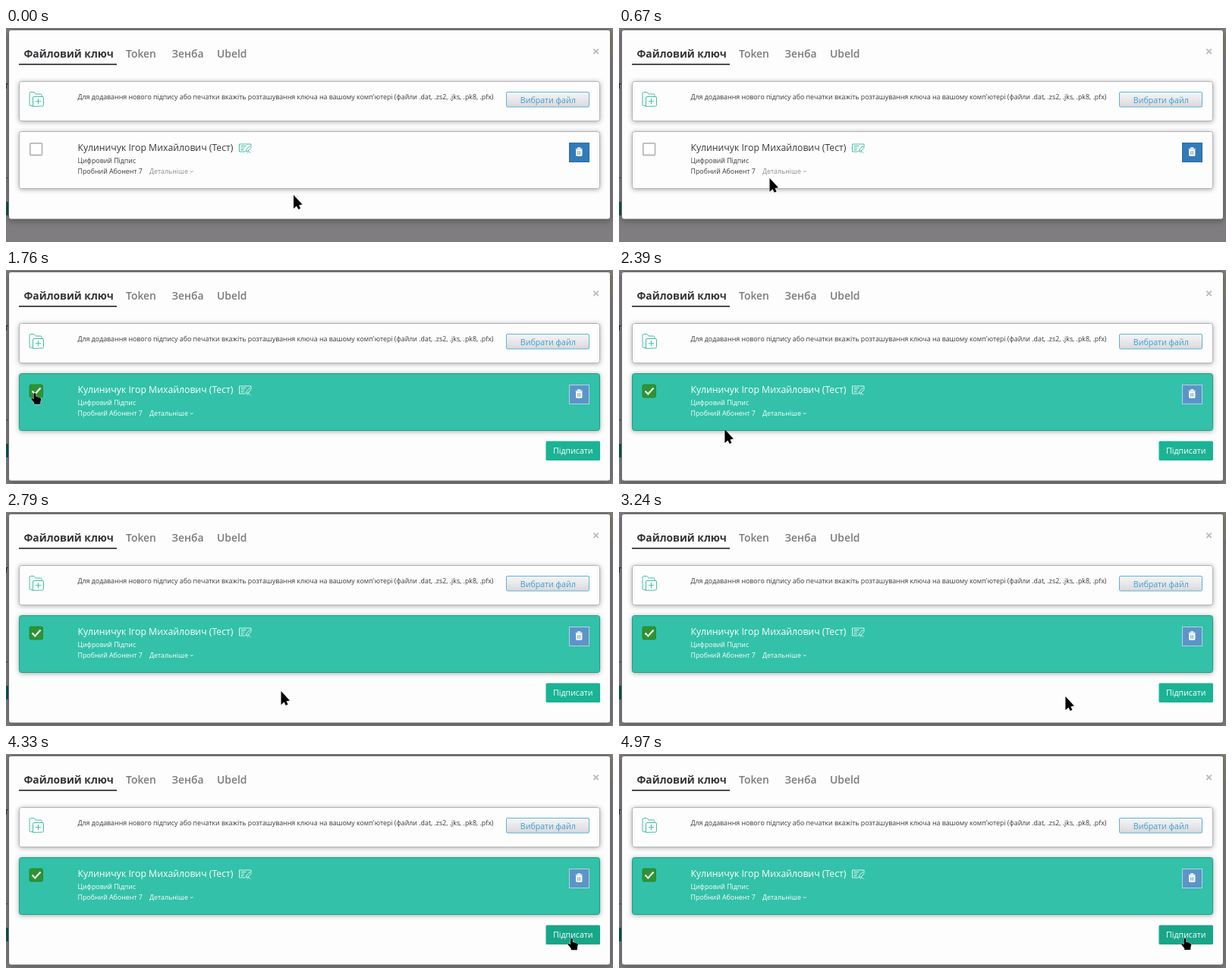
These frames come from a looping animation (800x282 px, 5000 ms). An HTML page:

```html
<!DOCTYPE html>
<html lang="uk">
<head>
<meta charset="utf-8">
<title>Вибір ключа</title>
<style>
html, body { margin: 0; width: 100%; height: 100%; overflow: hidden; background: #7f7d7f; }
svg { display: block; width: 800px; height: 282px; font-family: "Open Sans", "Noto Sans", sans-serif; font-size: 8.83px; }
.tab { font-size: 13.9px; font-weight: 600; fill: #7b7b7d; }
.tab.on { font-weight: 700; fill: #333336; font-size: 13.8px; }
.body { fill: #38383b; }
.name { font-size: 12.28px; }
.more { fill: #8b8b8d; }
.btn { font-size: 10.6px; text-anchor: middle; }
.line { fill: none; stroke: #3fc0a4; stroke-width: 1; stroke-linejoin: round; stroke-linecap: round; }
.panel { fill: #fefdfe; stroke: #b4b2b6; filter: drop-shadow(0 1px 3px rgba(0, 0, 0, .32)); }
.trash rect { fill: #337ab7; stroke: #2e6da4; }
.picked .card { fill: #33c1a9; stroke: #1f9f87; }
.picked .body, .picked .more { fill: #fff; }
.picked .line { stroke: #d9f7ef; }
.picked .trash rect { fill: #5b95c8; stroke: #b5d2e6; }
.on-only { display: none; }
.picked .on-only { display: inline; }
.picked .off-only { display: none; }
.sign { fill: #1ab394; }
.sign.hover { fill: #18a689; }
.cursor { fill: #000; stroke: #fff; stroke-width: .8; stroke-linejoin: round; paint-order: stroke; }
</style>
</head>
<body>
<svg id="stage" viewBox="0 0 800 282">
  <rect width="800" height="282" fill="#7f7d7f"/>
  <g>
    <rect x="797" width="3" height="36" fill="#85846f"/>
    <path d="M0 73.5H3M.5 73V80" stroke="#2b2a2b" fill="none"/>
    <path d="M0 197.5H4" stroke="#4b494b"/>
    <rect y="229" width="4" height="18" fill="#0d5a4a"/>
  </g>

  <rect id="modal" x="3.5" y="2.5" width="793" height="249.5" rx="3" fill="#fefdfe" stroke="#69676a"
    style="filter: drop-shadow(0 2px 4px rgba(0,0,0,.3))"/>

  <text class="tab on" x="23.5" y="39">Файловий ключ</text>
  <text class="tab" x="158" y="39">Token</text>
  <text class="tab" x="218.5" y="39">Зенба</text>
  <text class="tab" x="278" y="39">Ubeld</text>
  <rect x="17" y="47" width="129" height="1.7" fill="#2f2f31"/>
  <path d="M774.4 27.7l6.4 6.4m0-6.4l-6.4 6.4" stroke="#bdbbbe" stroke-width="1.9"/>

  <rect class="panel" x="17.5" y="70.5" width="765" height="52" rx="3"/>
  <path class="line" stroke-width="1.2" d="M35 102.5H32.5Q31 102.5 31 101V86Q31 84.500 32.500 84.500H37L39 87H45.500Q47 87 47 88.500V90M35.500 103V92Q35.500 90.500 37 90.500H48Q49.500 90.500 49.500 92V101.500Q49.500 103 48 103ZM42.500 93.500V100M39.300 96.700H45.700"/>
  <text class="body" x="94.500" y="94">Для додавання нового підпису або печатки вкажіть розташування ключа на вашому комп'ютері (файли .dat, .zs2, .jks, .pk8, .pfx)</text>
  <linearGradient id="grey" x2="0" y2="1">
    <stop stop-color="#f7f6f7"/><stop offset="1" stop-color="#d9d8da"/>
  </linearGradient>
  <rect x="659.500" y="84.500" width="109" height="19.500" rx="1.500" fill="url(#grey)" stroke="#5cb2da"/>
  <text class="btn" x="714.300" y="98.500" fill="#3a9fd2">Вибрати файл</text>

  <g id="key">
    <rect class="panel card" x="17.500" y="136.500" width="765" height="75" rx="3"/>
    <rect class="off-only" x="31.800" y="151.800" width="15.700" height="15.700" rx="1" fill="#fff" stroke="#b9b7ba" stroke-width="1.800"/>
    <g class="on-only">
      <rect x="31" y="151" width="17.500" height="17" rx="2" fill="#2f9332" stroke="#258029" stroke-width=".8"/>
      <path d="M34.500 159.500l3.800 4L45.500 155.500" fill="none" stroke="#fff" stroke-width="2.100"/>
    </g>
    <text class="body name" x="94.500" y="162.300">Кулиничук Ігор Михайлович (Тест)</text>
    <path class="line" d="M315 163H307.500V153H323V156M310 155.500H316M310 158H314M310 160.500H313M317 160l4-4.500 2 2-4 4.500-2.500.5zM318 164.500l2-2 2 2"/>
    <text class="body" x="94.500" y="177.800">Цифровий Підпис</text>
    <text class="body" x="94.500" y="191.800">Пробний Абонент 7</text>
    <text class="more" x="189" y="191.800">Детальніше</text>
    <path class="chevron" d="M243 188.300l1.700 1.700 1.700-1.700" fill="none" stroke="#929294"/>
    <g class="trash">
      <rect x="742.500" y="151.500" width="26" height="25"/>
      <path d="M751.500 160.500H759V167.500Q759 168.500 758 168.500H752.500Q751.500 168.500 751.500 167.500ZM750.700 159.200H759.800M753.500 159V157.800H757V159" fill="#fff" stroke="#fff" stroke-width=".9"/>
      <path d="M753.600 162V167M755.300 162V167M757 162V167" stroke="#337ab7" stroke-width=".6"/>
    </g>
  </g>

  <g id="submit">
    <rect id="sign" class="sign" x="711.500" y="225.500" width="71.500" height="25.500" rx="1.500"/>
    <text class="btn" x="747.300" y="242.300" fill="#fff">Підписати</text>
  </g>

  <path id="arrow" class="cursor" d="M0 0V18L4 14.500 6.300 19 9 17.700 7 13.400 11.500 12.500Z"/>
  <path id="hand" class="cursor" d="M-1.500 1Q0-1 1.400 1V5L3 4.800 4 5.600 5.600 5.500 6.300 6.400Q8.500 6.200 8.300 8.500L7.300 12V15H-.8V13L-4.600 8.300Q-4.900 6.500-3 6.900L-1.500 8.300Z"/>
</svg>
<script>
const LOOP = 5000, PICK = 1760;

// time, x, y of the pointer tip
const path = [
  [0, 379, 220], [250, 362, 219], [550, 255, 207], [850, 118, 182], [1050, 66, 171],
  [1210, 57, 169], [1450, 38, 162], [1880, 38, 162], [2100, 57, 180], [2390, 139, 210],
  [2700, 310, 231], [3000, 480, 243], [3240, 588, 243], [3500, 688, 244],
  [3790, 739, 245], [4050, 743, 244], [4480, 746, 243], [5000, 746, 243]
];
const $ = id => document.getElementById(id);
const modal = $('modal'), key = $('key'), submit = $('submit');
const sign = $('sign'), arrow = $('arrow'), hand = $('hand');
const chevron = key.querySelector('.chevron');

function slope(i, axis) {
  const a = path[i - 1], b = path[i], c = path[i + 1];
  if (!a || !c) return 0;
  const before = (b[axis] - a[axis]) / (b[0] - a[0]);
  const after = (c[axis] - b[axis]) / (c[0] - b[0]);
  return before * after > 0 ? 2 * before * after / (before + after) : 0;
}

function along(t, axis) {
  let i = 0;
  while (i < path.length - 2 && t >= path[i + 1][0]) i++;
  const a = path[i], b = path[i + 1], span = b[0] - a[0];
  const u = (t - a[0]) / span, v = 1 - u;
  return v * v * (1 + 2 * u) * a[axis] + u * u * (3 - 2 * u) * b[axis]
    + u * v * span * (v * slope(i, axis) - u * slope(i + 1, axis));
}

const show = (el, on) => { el.style.display = on ? '' : 'none'; };

function draw(t) {
  const x = along(t, 1), y = along(t, 2), picked = t >= PICK;
  const onBox = x > 31 && x < 49 && y > 150 && y < 169;
  const onSign = picked && x > 711 && y > 225 && y < 251;
  key.setAttribute('class', picked ? 'picked' : '');
  chevron.setAttribute('stroke', picked ? '#fff' : '#929294');
  modal.setAttribute('height', picked ? 275.5 : 249.5);
  show(submit, picked);
  sign.setAttribute('class', onSign ? 'sign hover' : 'sign');
  show(hand, onBox || onSign);
  show(arrow, !(onBox || onSign));
  for (const el of [hand, arrow]) el.setAttribute('transform', `translate(${x.toFixed(1)} ${y.toFixed(1)})`);
}

function tick() {
  draw(performance.now() % LOOP);
  requestAnimationFrame(tick);
}
tick();
</script>
</body>
</html>
```
